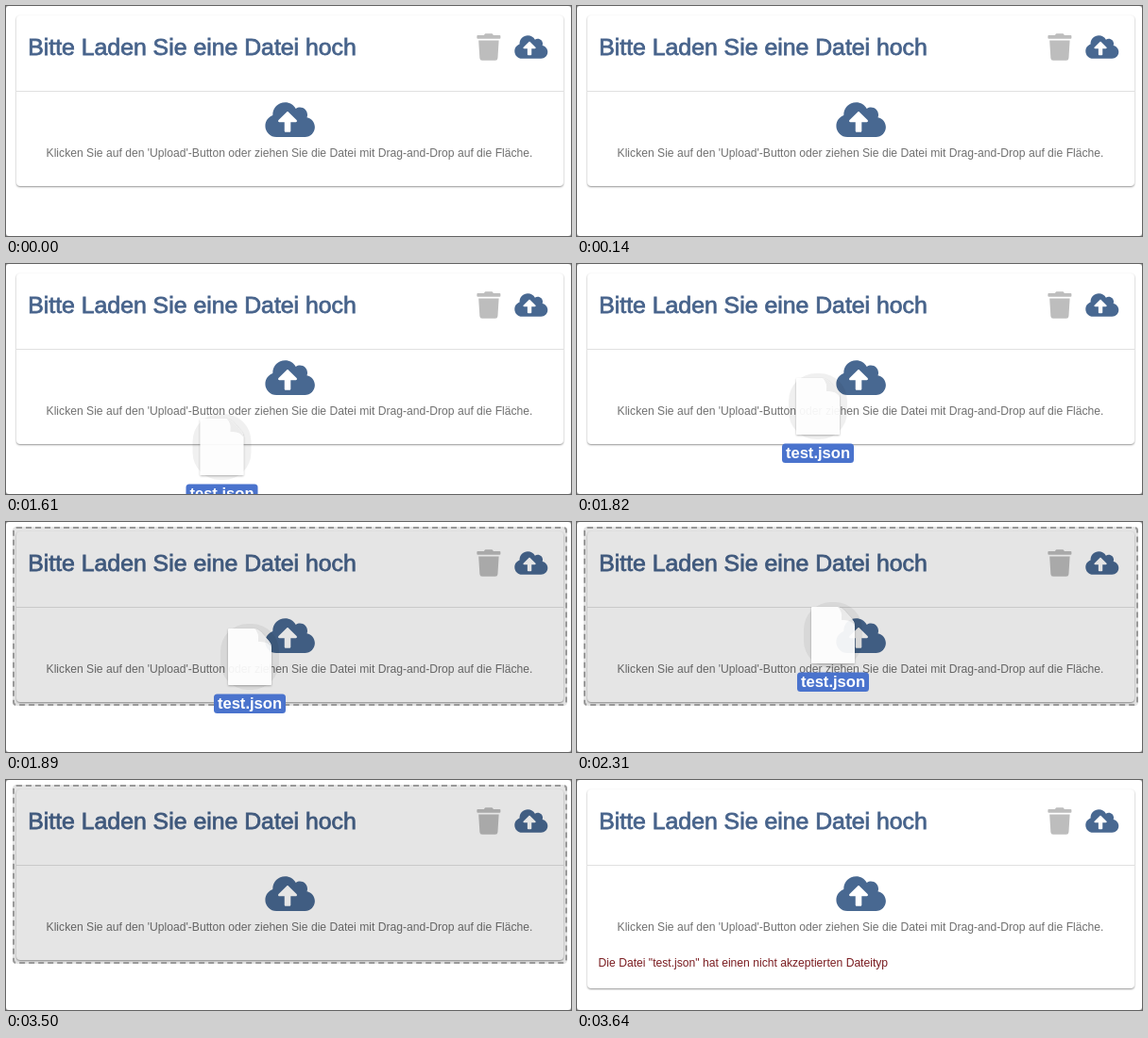
Recreate the animation shown at these times as an HTML page. Size 598 by 244 pixels, loop 5810 ms.

```html
<!DOCTYPE html>
<html lang="de">
<head>
<meta charset="utf-8">
<title>Datei-Upload</title>
<style>
  html, body { margin: 0; width: 100%; height: 100%; overflow: hidden; background: #999; }
  #stage { position: absolute; left: 0; top: 0; width: 598px; height: 244px; overflow: hidden;
    font-family: "Liberation Sans", Arial, sans-serif; }
  #stage > * { position: absolute; box-sizing: border-box; }
  .window { inset: 0; background: #fff; border-radius: 3px; }
  #card { left: 11px; top: 10px; width: 579px; height: 181px; background: #fff; border-radius: 4px;
    box-shadow: 0 1px 2px rgba(0,0,0,.42); }
  .rule { left: 11px; top: 90px; width: 579px; height: 1px; background: #e0e0e0; }
  svg { left: 0; top: 0; width: 598px; height: 244px; }
  #zone { left: 7px; top: 5px; width: 587px; height: 190px; border: 2px dashed #999;
    border-radius: 4px; background: rgba(0,0,0,.1); }
  .title { font-size: 24.82px; fill: #47638b; stroke: #47638b; stroke-width: .8px; }
  .text { font-size: 12.14px; fill: #707070; }
  .error { font-size: 12.14px; fill: #7a1c20; }
  .name { font-size: 16.6px; font-weight: bold; fill: #fff; }
</style>
</head>
<body>
<div id="stage">
  <div class="window"></div>
  <div id="card"></div>
  <div class="rule"></div>
  <svg viewBox="0 0 598 244">
    <defs>
      <path id="cloud" d="M537.6 226.6c4.1-10.7 6.4-22.4 6.4-34.6 0-53-43-96-96-96-19.7 0-38.1 6-53.3 16.2C367 64.2 315.3 32 256 32c-88.4 0-160 71.6-160 160 0 2.7.1 5.4.2 8.1C40.2 219.8 0 273.2 0 336c0 79.5 64.5 144 144 144h368c70.7 0 128-57.3 128-128 0-61.9-44-113.6-102.4-125.4zM393.4 288H328v112c0 8.8-7.2 16-16 16h-48c-8.8 0-16-7.2-16-16V288h-65.4c-14.3 0-21.4-17.2-11.3-27.3l105.4-105.4c6.2-6.2 16.4-6.2 22.6 0l105.4 105.4c10.1 10.1 2.9 27.3-11.3 27.3z"/>
    </defs>
    <text class="title" x="23.2" y="52">Bitte Laden Sie eine Datei hoch</text>
    <path fill="#bdbdbd" transform="translate(498.4 29.3) scale(.0558)" d="M432 32H312l-9-19a24 24 0 0 0-22-13H167a24 24 0 0 0-22 13l-9 19H16A16 16 0 0 0 0 48v32a16 16 0 0 0 16 16h416a16 16 0 0 0 16-16V48a16 16 0 0 0-16-16zM53 467a48 48 0 0 0 48 45h246a48 48 0 0 0 48-45l21-339H32z"/>
    <g fill="#486891">
      <use href="#cloud" transform="translate(538.3 29.5) scale(.0547)"/>
      <use href="#cloud" transform="translate(274.4 99.7) scale(.082)"/>
    </g>
    <text class="text" x="42.6" y="160">Klicken Sie auf den 'Upload'-Button oder ziehen Sie die Datei mit Drag-and-Drop auf die Fläche.</text>
    <text class="error" id="error" x="22.6" y="198">Die Datei "test.json" hat einen nicht akzeptierten Dateityp</text>
  </svg>
  <div id="zone"></div>
  <svg viewBox="0 0 598 244">
    <defs>
      <filter id="shade" x="-20%" y="-20%" width="140%" height="140%">
        <feDropShadow dx="0" dy="1" stdDeviation="1.2" flood-opacity=".3"/>
      </filter>
    </defs>
    <g id="file">
      <rect x="-8" y="-5" width="62" height="70" rx="29" opacity=".06"/>
      <g filter="url(#shade)" opacity=".93">
        <path fill="#fff" d="M1 0H28Q32 1 35 4L43 13Q46 16 46 20V59q0 1-1 1H1q-1 0-1-1V1q0-1 1-1z"/>
        <path fill="#ececec" d="M28 0Q33 4 32 14Q42 13 46 20Q46 16 43 13L35 4Q32 1 28 0z"/>
      </g>
      <rect x="-15" y="69.5" width="76" height="20.5" rx="3.5" fill="#4a73cd"/>
      <text class="name" x="23" y="85.3" text-anchor="middle">test.json</text>
    </g>
  </svg>
</div>
<script>
const LOOP = 5810, STEP = 70;
const ENTER = 1330, OVER = 1890, DROP = 3500, LEAVE = 3570, FAIL = 3640;

// time, x, y of the dragged page's top left corner
const path = [
  [1330, 147, 237], [1540, 194, 181], [1680, 217, 147], [1820, 232, 121],
  [1890, 235, 113], [1960, 238, 107], [2100, 242, 98], [2310, 248, 90],
  [2520, 257, 85.5], [2730, 260, 82.5], [2940, 261, 82]
];

const byId = id => document.getElementById(id);
const card = byId('card'), zone = byId('zone'), file = byId('file'), error = byId('error');
const show = (el, on) => { el.style.visibility = on ? 'visible' : 'hidden'; };

function position(t) {
  const i = path.findIndex(p => p[0] > t);
  if (i < 0) return path[path.length - 1].slice(1);
  if (i === 0) return path[0].slice(1);
  const [a, b] = [path[i - 1], path[i]];
  const k = (t - a[0]) / (b[0] - a[0]);
  return [1, 2].map(n => a[n] + (b[n] - a[n]) * k);
}

function draw(t) {
  const [x, y] = position(t);
  file.setAttribute('transform', `translate(${x.toFixed(1)} ${y.toFixed(1)})`);
  file.setAttribute('opacity', Math.min(1, .55 + (t - ENTER) / 400));
  show(file, t >= ENTER && t < DROP);
  show(zone, t >= OVER && t < LEAVE);
  show(error, t >= FAIL);
  card.style.height = (t >= FAIL ? 211 : 181) + 'px';
}

const start = performance.now();
function tick() {
  const t = (performance.now() - start) % LOOP;
  draw(Math.floor(t / STEP) * STEP);
  requestAnimationFrame(tick);
}
tick();
</script>
</body>
</html>
```
